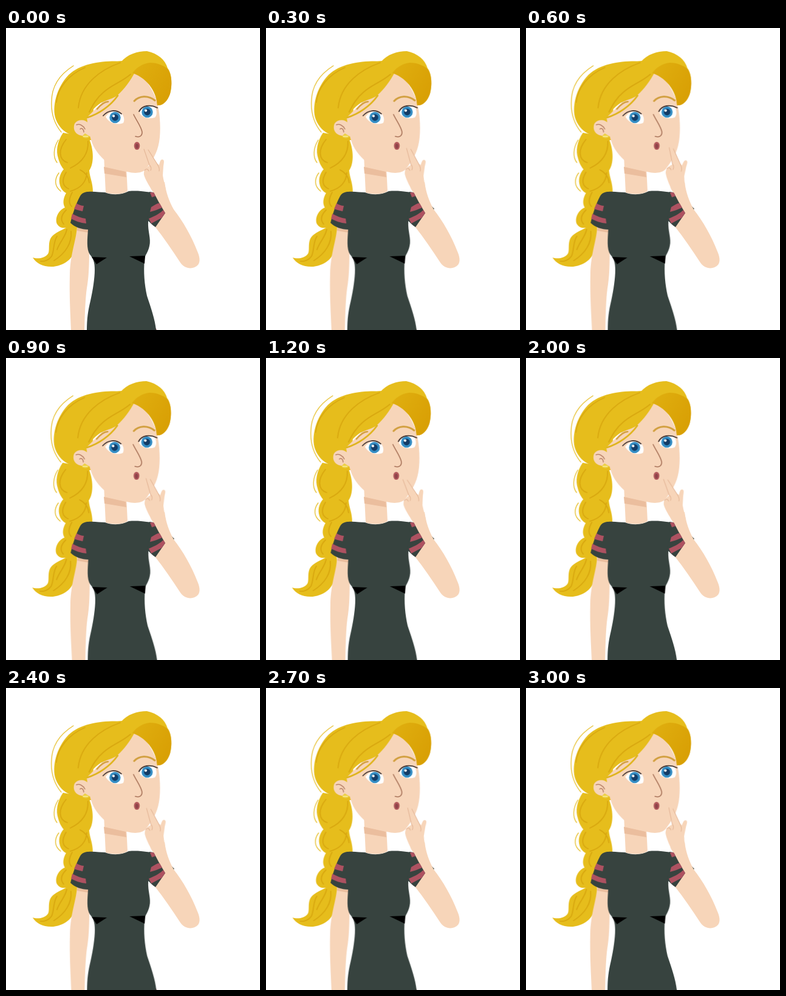
An HTML page that plays this animation: 418x496 px, repeating every 3.1 s.

```html
<!DOCTYPE html>
<html lang="en">
<head>
<meta charset="utf-8">
<title>Thinking woman</title>
<style>
html, body { margin: 0; width: 100%; height: 100%; overflow: hidden; background: #fff; }
svg { display: block; width: 418px; height: 496px; }
.line { fill: none; stroke-linecap: round; stroke-linejoin: round; }
.hair { fill: #e6bd1c; }
.strand { stroke: #d9a810; stroke-width: 1.8; }
.edge { stroke: #e6bf2c; stroke-width: 1.3; }
.stripe { fill: #ad5160; }
.cloth { fill: #37433f; }
.skin { fill: #f7d5b9; }
.shade { fill: #ebbe9e; }

.hand, .body, .head, .cuff { animation: 3100ms infinite; }
.hand { animation-name: tap; transform-origin: 250px 260px; }
.body { animation-name: sway; transform-origin: 180px 270px; }
.head { animation-name: nod; }
.cuff { animation-name: cuff; animation-timing-function: step-end; }

@keyframes tap {
  0% { transform: rotate(0deg); animation-timing-function: steps(6); }
  19.3548% { transform: rotate(8deg); animation-timing-function: steps(6); }
  38.7097% { transform: rotate(-1.6deg); animation-timing-function: steps(4); }
  51.6129% { transform: rotate(3.8deg); animation-timing-function: steps(4); }
  64.5161% { transform: rotate(-.6deg); animation-timing-function: steps(4); }
  77.4194% { transform: rotate(4deg); animation-timing-function: steps(6); }
  96.7742%, 100% { transform: rotate(7.4deg); animation-timing-function: steps(1); }
}
@keyframes sway {
  0% { transform: skewX(0deg); animation-timing-function: steps(6); }
  19.3548% { transform: skewX(.4deg); animation-timing-function: steps(6); }
  38.7097% { transform: skewX(.4deg); animation-timing-function: steps(4); }
  51.6129% { transform: skewX(.05deg); animation-timing-function: steps(4); }
  64.5161% { transform: skewX(.3deg); animation-timing-function: steps(4); }
  77.4194% { transform: skewX(.1deg); animation-timing-function: steps(6); }
  96.7742%, 100% { transform: skewX(.3deg); animation-timing-function: steps(1); }
}
@keyframes nod {
  0% { transform: translateX(0); animation-timing-function: steps(6); }
  19.3548% { transform: translateX(-.4px); animation-timing-function: steps(6); }
  38.7097% { transform: translateX(-1.2px); animation-timing-function: steps(4); }
  51.6129% { transform: translateX(-.2px); animation-timing-function: steps(4); }
  64.5161% { transform: translateX(-.8px); animation-timing-function: steps(4); }
  77.4194% { transform: translateX(-.2px); animation-timing-function: steps(6); }
  96.7742%, 100% { transform: translateX(-.7px); animation-timing-function: steps(1); }
}
@keyframes cuff {
  0% { opacity: 0; }
  3.2258%, 100% { opacity: 1; }
}
</style>
</head>
<body>
<svg viewBox="0 0 418 496">
  <defs>
    <linearGradient id="swoop" x1="0" y1="0" x2="1" y2=".6">
      <stop offset="0" stop-color="#e0b010"/>
      <stop offset="1" stop-color="#d9a005"/>
    </linearGradient>
    <g id="eye">
      <circle r="9.2" fill="#348dc3"/>
      <circle r="5.4" fill="#143c66"/>
      <circle cx="-2.4" cy="-2.4" r="2.1" fill="#fff"/>
    </g>
  </defs>

  <!-- braid -->
  <g class="head">
    <path class="hair" d="M94 172C84 187 82 202 86 214C88 222 92 229 95 232C88 240 86 250 89 259C91 265 95 269 99 271C94 280 93 288 97 295C86 299 80 313 84 322C88 328 93 329 99 328C90 333 81 336 75 343C68 352 73 366 69 371C64 378 52 380 44 377C50 387 62 393 78 392C100 389 112 377 117 355C119 345 119 334 117 324L128 275L143 269C143 254 138 246 137 234C145 223 145 200 136 180Z"/>
    <g class="line strand">
      <path d="M99 183C86 199 86 216 101 221M135 186C136 207 125 221 106 230M99 237C91 250 93 260 103 264M133 238C132 255 120 264 106 268M122 233C130 237 136 244 137 254M109 270C103 281 103 288 108 293M99 299C90 308 90 316 95 322M84 342C77 353 80 365 75 375C71 381 63 384 57 383M107 334C109 353 98 370 79 382M100 331C98 343 89 350 84 364"/>
    </g>
    <g class="line edge">
      <path d="M86 184C78 197 77 212 84 221M87 238C79 249 80 260 90 268"/>
    </g>
  </g>

  <!-- left arm and dress -->
  <path class="stripe" d="M240 481L248 496H240Z"/>
  <g class="body">
    <path class="skin" d="M117 325C116 348 106 369 105 404C104 440 106 470 107 496H129C130 461 131 437 134 421C138 398 137 352 137 325Z"/>
    <path class="shade" d="M117 328L135 331V336L117 333Z"/>
    <path class="cloth" d="M135 269C145 268 155 270 163 270C176 275 190 274 202 268C213 267 224 268 231 269L240 270L246 295L234 318C233 334 239 346 236 358C234 369 228 373 228 381C226 400 228 422 232 440C239 461 245 478 247 496H133C133 478 135 464 139 448C143 430 146 411 146 397C146 385 144 379 138 372C132 363 134 346 135 331C124 331 113 327 106 320C110 304 115 289 122 276C125 271 130 269 135 269Z"/>
    <path class="stripe" d="M116 288C119 290 124 292 128 292L126 301C120 300 115 298 112 297ZM109 305C116 309 124 312 131 313L132 321C122 320 114 317 107 313Z"/>
    <path d="M141 376L166 377L149 388ZM203 375L229 374L228 387Z"/>
  </g>

  <!-- neck and head -->
  <path class="skin" d="M161 208H197L200 268C190 274 175 274 164 270Z"/>
  <path class="shade" d="M161 228L197 236L198 245L162 239Z"/>
  <g class="head">
    <path class="hair" d="M195 55C165 53 125 56 103 77C83 98 75 130 82 150C87 163 96 171 106 175C120 185 130 186 140 184L145 120L205 75Z"/>
    <path class="line edge" d="M111 62C87 77 75 97 75 121C74 144 82 160 91 171"/>
    <path class="skin" d="M211 70C230 80 244 105 249 123C254 144 255 169 252 187C249 205 241 218 230 232C223 239 211 239 199 236C176 231 154 214 144 194C139 184 136 171 133 147Z"/>
    <path class="skin" d="M136 157C131 150 119 149 113 157C109 167 115 178 130 177L139 178Z"/>
    <path class="line" stroke="#b9846a" stroke-width="1.5" d="M116 159C121 157 127 160 130 166M122 166C125 163 128 167 128 171"/>
    <path fill="#ecd044" d="M130 173L125 178C129 182 134 182 138 178Z"/>
    <path d="M127 178H135" stroke="#fff4b0" stroke-width="1.2"/>

    <path class="hair" d="M195 54C168 53 133 75 120 108C116 125 120 142 133 148C138 139 146 130 156 123C166 118 176 116 183 111C195 100 204 88 213 71Z"/>
    <path class="line" stroke="#e0b41c" stroke-width="2.6" d="M134 147C153 141 172 128 184 111"/>
    <path class="hair" d="M189 56C200 43 216 38 232 38C250 42 262 52 266 66C273 74 274 94 270 108C266 120 258 128 249 127C248 108 236 84 210 73Z"/>
    <path fill="url(#swoop)" d="M208 74C214 66 224 58 237 57C249 57 260 62 266 67C273 76 274 94 270 108C266 120 258 128 249 127C248 108 236 84 208 74Z"/>
    <g class="line strand">
      <path d="M188 57C157 68 123 91 119 131M83 122C85 99 102 77 130 65M205 76C190 89 174 93 160 106C149 115 143 126 137 138"/>
    </g>
    <g class="line" stroke="#d2a040">
      <path stroke-width="2.6" d="M150 133C156 126 162 121 168 121"/>
      <path stroke-width="3" d="M211 120C219 111 234 110 245 119"/>
    </g>

    <path fill="#fff" d="M164 146C170 136 184 134 191 141C195 147 195 152 193 156C181 160 170 156 164 146Z"/>
    <use href="#eye" x="179.5" y="147"/>
    <path fill="#fff" d="M220 140C222 129 236 125 246 131C249 138 248 144 245 147C235 150 225 148 220 140Z"/>
    <use href="#eye" x="232.5" y="138"/>
    <g class="line" stroke="#493a36" stroke-width="1.8">
      <path d="M160 144C168 135 181 133 190 141M219 137C224 127 237 125 249 131"/>
    </g>
    <path class="line" stroke="#a9745a" stroke-width="1.6" d="M210 142C214 151 223 163 224 171C224 178 219 180 213 178"/>
    <ellipse cx="215.5" cy="193.5" rx="4.8" ry="6.6" fill="#b3595c"/>
    <ellipse cx="215.5" cy="194" rx="2.4" ry="4" fill="#8f444a"/>
  </g>

  <!-- raised arm -->
  <path class="cloth cuff" d="M268 288L277 297L272 301Z"/>
  <path class="skin" d="M238 262C249 280 252 300 245 326C260 345 273 364 286 384C294 397 309 397 316 389C320 384 319 376 315 367C306 343 291 317 276 298C268 284 263 269 261 253Z"/>
  <path class="cloth" d="M236 269L243 270L252 287L262 304L246 327C241 324 236 319 232 314C235 300 237 285 236 269Z"/>
  <path class="stripe" d="M237 270L243 270L246 276L240 278ZM239 294C245 291 250 287 253 288L257 295C250 298 245 300 237 302ZM235 313C245 309 254 304 259 299L262 304L256 312C250 315 245 318 239 321Z"/>
  <g class="hand">
    <path class="skin" d="M239 265C236 259 229 249 227 241C226 233 231 229 236 226C237 223 228 203 227 197C228 194 231 195 233 198L248 222L252 225C253 221 254 216 257 216C261 216 260 220 259 227L258 242C259 250 262 258 263 266C258 277 246 276 239 265Z"/>
    <path class="line" stroke="#e3b596" stroke-width="1.1" d="M227 199L236 225C238 227 240 230 238 234M228 234C231 230 234 232 235 235M234 200L248 222C251 227 253 230 252 235"/>
  </g>
</svg>
</body>
</html>
```
